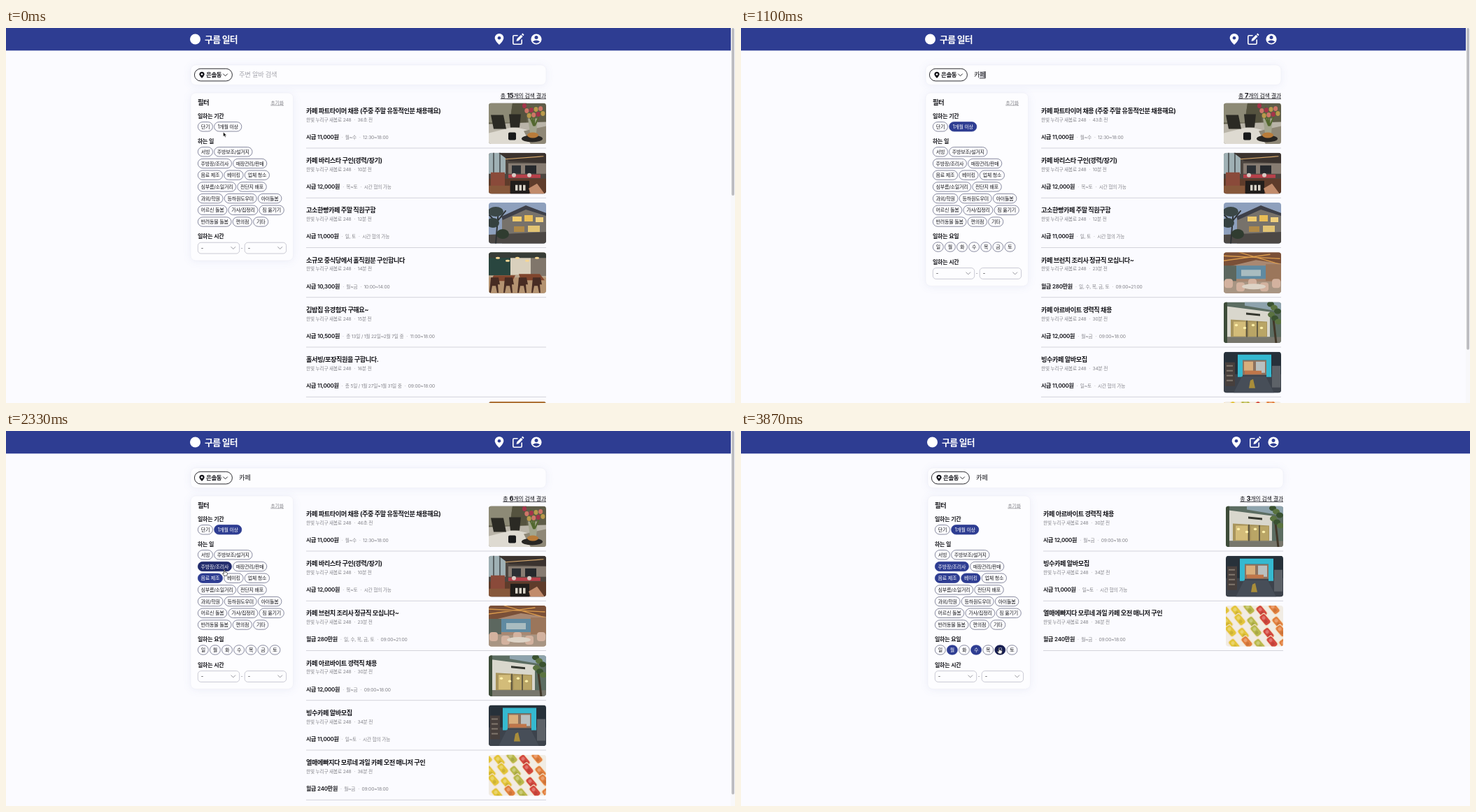
An HTML page that plays this animation: 1042x537 px, repeating every 3900 ms.

```html
<!DOCTYPE html>
<html lang="ko">
<head>
<meta charset="utf-8">
<style>
html, body { margin: 0; width: 100%; height: 100%; overflow: hidden; background: #fbfbff }
svg { display: block; width: 100%; height: 100% }
text { font-family: Inter, "Noto Sans CJK KR", "Noto Sans CJK", sans-serif; white-space: pre }
text, tspan { letter-spacing: -.03em }
text[font-weight="700"] { letter-spacing: -.05em }
.u { text-decoration: underline }
.soft { filter: drop-shadow(0 1px 6px #3040a012) }
</style>
</head>
<body>
<svg viewBox="0 0 1042 537">
  <defs id="photos"></defs>
  <g id="page"></g>
  <g id="cursor"></g>
</svg>
<script>
const LOOP = 3900, BLUE = '#2e3d92', DARK = '#171e52', PALE = '#c6ccee', PAPER = '#fdfdff', INK = '#15151a', GRAY = '#85858b';
const $ = id => document.getElementById(id);

// Drawing helpers, all returning SVG markup
const rect = (x, y, w, h, fill, more = '') => `<rect x="${x}" y="${y}" width="${w}" height="${h}" fill="${fill}" ${more}/>`;
const oval = (x, y, rx, ry, fill) => `<ellipse cx="${x}" cy="${y}" rx="${rx}" ry="${ry}" fill="${fill}"/>`;
const path = (d, fill) => `<path d="${d}" fill="${fill}"/>`;
const line = (d, stroke, width = 1) =>
  `<path d="${d}" fill="none" stroke="${stroke}" stroke-width="${width}" stroke-linecap="round" stroke-linejoin="round"/>`;
const text = (x, y, size, weight, fill, str, more = '') =>
  `<text x="${x}" y="${y + size * .36}" font-size="${size}" font-weight="${weight}" fill="${fill}" ${more}>${str}</text>`;
const repeat = (n, fn) => Array.from({ length: n }, (_, i) => fn(i)).join('');
const chevron = (x, y, color) => line(`M${x - 3} ${y - 1.5}l3 3 3-3`, color, .9);
const pin = (x, y, scale, fill, hole) => `<g transform="translate(${x} ${y}) scale(${scale})">`
  + path('M0-8A6.3 6.3 0 0 1 6.3-1.7C6.3 2.5 0 8 0 8S-6.3 2.5-6.3-1.7A6.3 6.3 0 0 1 0-8z', fill)
  + oval(0, -1.7, 2.3, 2.3, hole) + '</g>';
const mix = (from, to, k) => '#' + [1, 3, 5].map(i => {
  const [a, b] = [from, to].map(c => parseInt(c.slice(i, i + 2), 16));
  return Math.round(a + (b - a) * k).toString(16).padStart(2, '0');
}).join('');

// Simplified pictures, 82 x 58.5
const pictures = {
  vase: rect(0, 0, 82, 59, '#5f5d49') + path('M0 0H34L30 28H0z', '#8d8a76') + path('M34 0H54V28H30z', '#55533f')
    + path('M0 30L82 27V59H0z', '#b9b4a8') + path('M0 43L36 34 82 45V59H0z', '#dedad1')
    + path('M3 17h18l4 20H7zM29 16h17l-2 19H31z', '#2b2a24') + path('M50 40L82 33V59H60z', '#8f8877')
    + path('M56 22h14l-2 21H59z', '#a3a58e') + line('M64 32L54 8M65 32L66 6M66 32L76 10M64 30L60 6', '#53682f', 2)
    + repeat(9, i => oval(51 + i * 3.3, 4 + i * 7 % 15, 3, 3.4, ['#a5344a', '#cf7568', '#b99a4c'][i % 3]))
    + rect(28, 42, 11, 11, '#191a1b', 'rx="2"') + oval(62, 51, 15, 5, '#282623') + oval(63, 46, 8, 4, '#b97c3a'),
  counter: rect(0, 0, 82, 59, '#4d4640') + rect(0, 0, 24, 30, '#9fb0b4') + line('M7 0V30M16 0V30', '#575f61', 2)
    + path('M14 0H82V15L30 12z', '#3b332f') + rect(28, 15, 54, 15, '#877c72') + line('M24 9L78 5', '#d7a96c', 1.2)
    + rect(33, 18, 13, 12, '#2c3034') + rect(52, 18, 16, 12, '#25282c') + rect(28, 31, 46, 5, '#b8404a')
    + oval(36, 32, 3, 3, '#d8c9c3') + oval(58, 32, 3, 3, '#d8c9c3')
    + rect(0, 37, 82, 22, '#5f3c2b') + rect(3, 28, 20, 20, '#8a4a3a') + rect(0, 47, 30, 12, '#87583b') + rect(31, 40, 27, 19, '#211d1b')
    + repeat(3, i => rect(38 + i * 5.5, 46, 3.5, 8, '#d9d4c9')) + path('M57 51L69 44 80 59H60z', '#c18b6b'),
  dusk: rect(0, 0, 82, 59, '#8ea0bd') + path('M19 20L53 5 82 15V59H19z', '#77726b') + path('M18 20L53 4 82 15V19L53 10 20 25z', '#3e4049')
    + rect(34, 20, 13, 7, '#f0cb6d') + rect(51, 18, 12, 9, '#e9bd55') + rect(67, 21, 11, 7, '#efcf7d')
    + rect(36, 34, 15, 8, '#b08a48') + rect(56, 33, 17, 9, '#e2c474') + path('M0 46L82 42V59H0z', '#4c4845')
    + line('M10 59L14 10M12 30L1 18M13 26L24 12', '#2d3133', 2) + oval(10, 13, 11, 7, '#3b4747') + oval(6, 29, 9, 7, '#354140')
    + oval(20, 45, 9, 7, '#303c30'),
  tables: rect(0, 0, 82, 59, '#bca78d') + rect(0, 0, 31, 33, '#29463f') + rect(31, 8, 29, 24, '#d9d0bd') + rect(60, 5, 22, 29, '#80766b')
    + rect(0, 0, 82, 8, '#373c37') + repeat(5, i => oval(13 + i * 14, 8 + i % 2 * 4, 3, 1.5, '#f7d794'))
    + rect(0, 36, 82, 23, '#b49371') + path('M7 33H38L34 41H3zM43 31H73L80 40H46z', '#80452d')
    + repeat(4, i => path(`M${3 + i * 20} 36h11l2 10h-3l1 12h-2l-2-10h-5l-2 10h-2z`, '#472c23')),
  feast: rect(0, 0, 82, 59, '#574937') + oval(17, 13, 18, 12, '#4e8a38') + oval(44, 10, 12, 9, '#e3ded0') + oval(64, 22, 15, 13, '#bd4045')
    + oval(18, 44, 17, 14, '#ded5c7') + oval(18, 44, 13, 10, '#c84349') + oval(44, 31, 12, 9, '#252824') + oval(44, 31, 9, 6, '#d3b65c')
    + rect(57, 33, 25, 26, '#d9a746') + oval(68, 45, 8, 8, '#e5cd74') + rect(0, 0, 82, 3, '#ad7134')
    + repeat(12, i => oval(3 + i * 17 % 78, 5 + i * 13 % 50, 3, 2, ['#75a447', '#e9d47a', '#d75953'][i % 3])),
  brunch: rect(0, 0, 82, 59, '#a98872') + path('M0 0H82V16L46 11 0 22z', '#7a5038') + line('M0 5L80 9M0 12L66 3M22 0L80 17', '#d99a4c', 1.3)
    + rect(18, 19, 42, 19, '#608aa1') + rect(0, 19, 18, 22, '#5c675f') + rect(60, 17, 22, 24, '#9b765b')
    + rect(25, 25, 28, 9, '#a9bcc0') + rect(0, 42, 82, 17, '#a89583')
    + repeat(5, i => rect(1 + i * 17, 38 + i % 2 * 5, 12, 13, '#d3b29f', 'rx="4"')) + oval(43, 49, 17, 4, '#ddd3c6'),
  shop: rect(0, 0, 82, 59, '#5c6d62') + path('M30 0H82V14L30 5z', '#8ea3ad') + path('M4 6L66 14V50H4z', '#d9d7cd')
    + path('M10 25L62 28V50H10z', '#a8945c') + rect(14, 28, 17, 21, '#d3bc79') + rect(36, 29, 25, 20, '#b9a566')
    + line('M33 27V50M48 28V50', '#4a4639', 1.5) + path('M32 15L52 17V20L32 18z', '#35372f')
    + repeat(4, i => oval(18 + i * 12, 33 + i % 2 * 4, 2.2, 1.8, '#fff0ab'))
    + rect(0, 50, 82, 9, '#77766c') + line('M75 59L70 16', '#423829', 3)
    + repeat(6, i => oval(67 + i * 5 % 14, 3 + i * 5, 5, 4, i % 2 ? '#5a7340' : '#3a5230')) + rect(0, 0, 5, 59, '#3d4c39'),
  night: rect(0, 0, 82, 59, '#27313a') + rect(0, 32, 82, 27, '#3d434c') + path('M20 4H68V36H61V12H27V36H20z', '#35b9d0')
    + rect(27, 12, 34, 21, '#8d725f') + rect(29, 14, 13, 13, '#d9ae7c') + rect(46, 14, 13, 16, '#b9c0c0') + rect(30, 27, 24, 5, '#c0764a')
    + rect(2, 15, 14, 34, '#473f3c') + rect(69, 20, 12, 31, '#5d6268') + repeat(4, i => rect(4, 19 + i * 7, 9, 2, '#80766c'))
    + path('M26 35H60L72 59H14z', '#474e58') + path('M38 41L42 39 45 52H36z', '#a98d3a'),
  fruit: rect(0, 0, 82, 59, '#f1ece4') + repeat(20, i => {
    const row = i / 5 | 0, x = i % 5 * 18 + row * 5 - 3, y = 4 + row * 16 + i % 2 * 4;
    const color = x < 28 ? '#e3c53a' : ['#d4493f', '#e2803f', '#b9b94c'][(i + row) % 3];
    return `<g transform="translate(${x} ${y}) rotate(50)">` + rect(-9, -5.5, 18, 11, '#f3dfc0', 'rx="3"')
      + rect(-8, -4.5, 16, 9, color, 'rx="3"') + oval(-3, 0, 2.5, 2.5, '#ffffff40') + oval(3, 1, 2.5, 2.5, '#00000018') + '</g>';
  })
};
$('photos').innerHTML = '<clipPath id="round"><rect width="82" height="58.5" rx="4"/></clipPath>'
  + Object.entries(pictures).map(([id, art]) => `<g id="${id}" clip-path="url(#round)">${art}</g>`).join('');

// title, age, pay, days, hours, picture
const ANY = '시간 협의 가능';
const jobs = [
  ['카페 파트타이머 채용 (주중 주말 유동적인분 채용해요)', '', '시급 11,000원', '월~수', '12:30~18:00', 'vase'],
  ['카페 바리스타 구인(경력/장기)', '10분', '시급 12,000원', '목~토', ANY, 'counter'],
  ['고소한빵카페 주말 직원구함', '12분', '시급 11,000원', '일, 토', ANY, 'dusk'],
  ['소규모 중식당에서 홀직원분 구인합니다', '14분', '시급 10,300원', '월~금', '10:00~14:00', 'tables'],
  ['김밥집 유경험자 구해요~', '15분', '시급 10,500원', '총 13일 / 1월 22일~2월 7일 중', '11:00~18:00'],
  ['홀서빙/포장직원을 구합니다.', '16분', '시급 11,000원', '총 5일 / 1월 27일~1월 31일 중', '09:00~18:00'],
  ['전골마음가득 식당 홀 정직원 모집합니다.', '17분', '월급 310만원', '월~토', '11:00~21:00', 'feast'],
  ['qm47 금,토,일 야간 알바 구합니다.', '22분', '시급 10,030원', '일, 금, 토', '02:00~07:30'],
  ['카페 브런치 조리사 정규직 모십니다~', '23분', '월급 280만원', '일, 수, 목, 금, 토', '09:00~21:00', 'brunch'],
  ['카페 아르바이트 경력직 채용', '30분', '시급 12,000원', '월~금', '09:00~18:00', 'shop'],
  ['빙수카페 알바모집', '34분', '시급 11,000원', '일~토', ANY, 'night'],
  ['열매에빠지다 모루네 과일 카페 오전 매니저 구인', '36분', '월급 240만원', '월~금', '09:00~18:00', 'fruit']
];
// time, result count, age of the first job in seconds, visible jobs
const results = [
  [0, 15, 36, [0, 1, 2, 3, 4, 5, 6]],
  [300, 13, 41, [0, 1, 2, 3, 6, 7, 8]],
  [1080, 7, 43, [0, 1, 2, 8, 9, 10, 11]],
  [1780, 5, 45, [0, 1, 9, 10, 11]],
  [2230, 6, 46, [0, 1, 8, 9, 10, 11]],
  [2530, 7, 47, [0, 1, 2, 8, 9, 10, 11]],
  [2960, 4, 48, [0, 9, 10, 11]],
  [3750, 3, 49, [9, 10, 11]]
];
// hover, click, leave
const clicks = {
  '1개월 이상': [100, 230, 430], '음료 제조': [1600, 1720, 1840], '주방장/조리사': [1950, 2170, 2280],
  '베이킹': [2380, 2470, 2560], '월': [2780, 2900, 3130], '수': [3220, 3450, 3550], '금': [3600, 3720, LOOP]
};
const typing = [[0, ''], [780, 'ㅋ'], [860, '카'], [940, '캎'], [1020, '카페']];
const moves = [
  [0, 310.5, 149], [100, 312, 146], [230, 319, 140], [380, 320, 137], [430, 321, 130], [650, 345, 67], [1250, 345, 67],
  [1640, 294, 209], [1800, 295, 209], [2000, 303, 197], [2250, 305, 193], [2450, 325, 209], [2560, 325, 211],
  [2670, 305.5, 285], [2850, 299, 311], [3100, 300, 311], [3370, 336, 310], [3560, 336, 310], [3700, 369, 310.5], [LOOP, 369, 310.5]
];
const pointers = [[0, 'arrow'], [100, 'hand'], [410, 'arrow'], [600, 'beam'], [720, ''], [1250, 'beam'], [1320, 'arrow'], [1560, 'hand']];
const shapes = {
  arrow: '<path d="M0 0V6.6L1.6 5.2 2.7 7.6 3.8 7.1 2.8 4.8H4.8z" fill="#111" stroke="#fff" stroke-width=".5"/>',
  hand: '<path d="M-.7.2Q0-.6.7.2V3.2L3.8 4Q4.6 4.4 4.3 5.6L3.5 8.5H-.6L-2.6 5.4Q-2.5 4.3-1.5 4.8L-.7 5.5z" fill="#fff" stroke="#222" stroke-width=".7"/>',
  beam: line('M-1.5-4Q0-4 0-3V3Q0 4-1.5 4M1.5-4Q0-4 0-3M0 3Q0 4 1.5 4', '#222', .7)
};
const at = (list, t) => list.findLast(e => e[0] <= t);

// Each change of a chip's state fades in over 130 ms
function chipColor(times, t) {
  const fade = start => Math.min(1, Math.max(0, (t - start) / 130));
  return [PALE, DARK, BLUE].reduce((color, next, i) => mix(color, next, fade(times[i])), PAPER);
}
function chip(x, y, label, t) {
  const width = 8.8 + [...label].reduce((w, c) => w + ({ ' ': 1.7, '/': 2.2, 1: 3.9 }[c] || 6.2), 0);
  const times = clicks[label] || [LOOP, LOOP, LOOP], fill = chipColor(times, t), picked = t >= times[1];
  return [width, rect(x, y - 6.7, width, 13.4, fill, `rx="6.7" stroke="${picked ? fill : '#565a78'}" stroke-width=".7"`)
    + text(x + width / 2, y, 7, 400, picked ? '#fff' : INK, label, 'text-anchor="middle"')];
}
function chips(y, labels, t) {
  let x = 274.3;
  return labels.split(',').map(label => {
    const [width, art] = chip(x, y, label, t);
    x += width + 2.1;
    return art;
  }).join('');
}

const header = () => oval(270.5, 16, 7.5, 7.5, '#fff') + text(284, 16, 12.8, 700, '#fff', '구름 일터')
  + pin(705, 16, 1, '#fff', BLUE)
  + line('M731 10.8H726.3Q724.8 10.8 724.8 12.3V21.7Q724.8 23.2 726.3 23.2H735.7Q737.2 23.2 737.2 21.7V17', '#fff', 1.6)
  + path('M729.5 19L730.2 15.8 736.2 9.8 738.6 12.2 732.6 18.2zM737 9L738.4 7.6 740.6 9.8 739.2 11.2z', '#fff')
  + oval(758, 16, 7.6, 7.6, '#fff') + oval(758, 13.4, 2.5, 2.5, BLUE) + path('M752.8 19.5Q758 15.5 763.2 19.5Q758 24.4 752.8 19.5z', BLUE);

const panel = (y, w, h) => rect(264, y, w, h, PAPER, 'rx="7" stroke="#efeff6" stroke-width=".7" class="soft"');

function search(t) {
  const typed = at(typing, t)[1], composing = typed && t < 1300;
  const last = 333 + (typed.length - 1) * 8.2;
  return panel(53, 508, 28.5) + rect(269.4, 58.3, 54, 17.6, '#fff', `rx="8.8" stroke="${INK}" stroke-width=".9"`)
    + pin(280, 67.3, .57, INK, '#fff') + text(286, 67, 8.5, 700, INK, '은솔동') + chevron(313.5, 67.3, INK)
    + (composing ? rect(last, 62, 8.2, 10, '#d4d4da') + line(`M${last} 72H${last + 8}V62.5`, INK, .7) : '')
    + text(333, 67, 9.3, 400, typed ? INK : '#a6a6ad', typed || '주변 알바 검색');
}

function filters(t, days) {
  const low = days ? 36.4 : 0, heading = (y, s) => text(274, y, 8, 600, INK, s);
  const select = x => rect(x, 307.2 + low, 59.4, 15.8, PAPER, 'rx="4.5" stroke="#bdbdc8" stroke-width=".8"')
    + text(x + 4.5, 315 + low, 7.5, 400, INK, '-') + chevron(x + 50.5, 315 + low, '#888890');
  return panel(93, 146.5, 240 + low)
    + text(274, 107, 9.3, 700, INK, '필터') + text(397, 107, 7, 400, GRAY, '초기화', 'text-anchor="end" class="u"')
    + heading(126.5, '일하는 기간') + chips(141.3, '단기,1개월 이상', t) + heading(162.5, '하는 일')
    + ['서빙,주방보조/설거지', '주방장/조리사,매장관리/판매', '음료 제조,베이킹,업체 청소', '심부름/소일거리,전단지 배포',
      '과외/학원,등하원도우미,아이돌봄', '어르신 돌봄,가사/집정리,짐 옮기기', '반려동물 돌봄,편의점,기타']
      .map((row, i) => chips(177.3 + i * 16.7, row, t)).join('')
    + (days ? heading(298.5, '일하는 요일') + chips(313.5, '일,월,화,수,목,금,토', t) : '')
    + heading(298.5 + low, '일하는 시간') + select(274.3) + text(335.6, 315 + low, 7, 400, GRAY, '-') + select(341.2);
}

function job(id, row, seconds) {
  const [title, age, pay, days, hours, picture] = jobs[id], y = 107.5 + row * 71.25;
  const gray = (s, dx) => `<tspan font-size="6.7" font-weight="400" fill="${GRAY}" dx="${dx}">${s}</tspan>`;
  const after = s => gray('·', 4) + gray(s, 3.4);
  return text(429, y + 11, 9.2, 700, INK, title)
    + text(429, y + 23.8, 6.7, 400, GRAY, '한빛 누리구 새봄로 248' + after((age || seconds + '초') + ' 전'))
    + text(429, y + 48.4, 8, 600, INK, pay + after(days) + after(hours))
    + (picture ? `<use href="#${picture}" x="690" y="${y}"/>` : '')
    + rect(429, y + 64.1, 343, .8, '#c9c9d2');
}

function page(t) {
  const [, count, seconds, ids] = at(results, t), height = 122 + 72 * count, scrolls = height > 537;
  return rect(0, 0, 1042, 537, '#fbfbff') + rect(0, 32, 1042, 1, '#b9bfe2') + rect(0, 0, 1042, 32, BLUE)
    + `<g transform="translate(${scrolls ? 0 : 3} 0)">` + header() + search(t) + filters(t, t >= 230)
    + text(772, 97, 8, 400, INK, `총 <tspan font-size="9.4" font-weight="700">${count}</tspan>개의 검색 결과`, 'text-anchor="end" class="u"')
    + ids.map((id, row) => job(id, row, seconds)).join('') + '</g>'
    + (scrolls ? rect(1036, 0, 6, 537, '#f8f8fa') + rect(1037.2, 0, 3.8, 537 * 537 / height, '#bcbcc0', 'rx="1.9"') : '');
}

function cursor(t) {
  const i = moves.findLastIndex(m => m[0] <= t), [t0, x0, y0] = moves[i], [t1, x1, y1] = moves[i + 1];
  const k = (t - t0) / (t1 - t0), e = k * k * (3 - 2 * k);
  const shape = shapes[at(pointers, t)[1]] || '';
  return `<g transform="translate(${x0 + (x1 - x0) * e} ${y0 + (y1 - y0) * e})">${shape}</g>`;
}

let shown = '';
function draw(now) {
  const t = now % LOOP, art = page(t);
  if (art !== shown) $('page').innerHTML = shown = art;
  $('cursor').innerHTML = cursor(t);
  requestAnimationFrame(draw);
}
draw(0);
</script>
</body>
</html>
```
